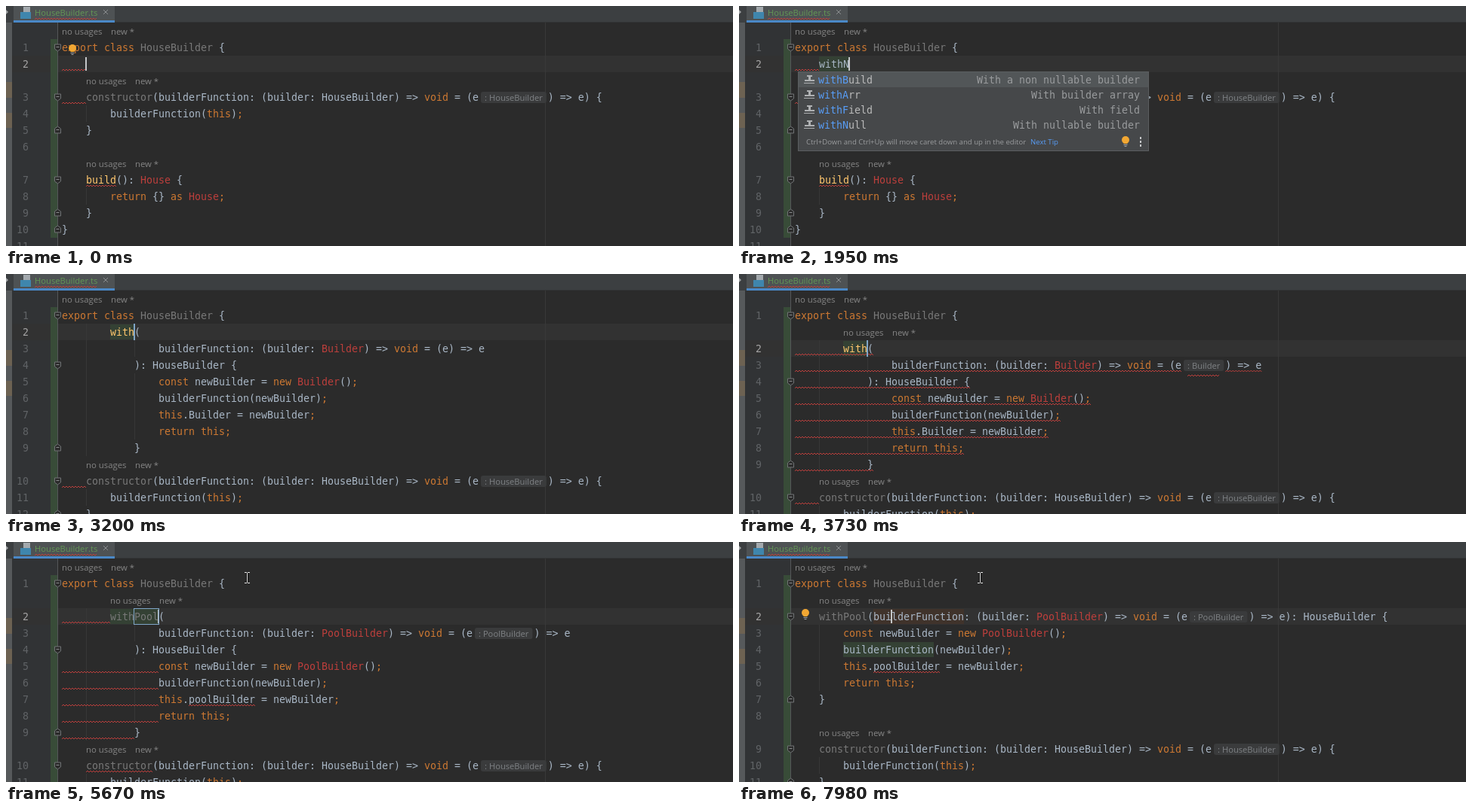
These frames come from a looping animation (963 px wide and 319 px high, 8.18 s). An HTML page with a canvas:

```html
<!DOCTYPE html>
<html lang="en">
<head>
<meta charset="utf-8">
<title>Live template</title>
<style>
  html, body { margin: 0; width: 100%; height: 100%; overflow: hidden; background: #2b2b2b; }
  canvas { display: block; }
</style>
</head>
<body>
<canvas id="stage" width="963" height="319"></canvas>
<script>
const ctx = document.getElementById('stage').getContext('2d');
const LOOP = 8180, LEFT = 74, CHAR = 8, ROW = 22, TOP = 33;
const MONO = '13.29px "DejaVu Sans Mono", "Noto Sans Mono", monospace';
const ui = size => `${size}px "Open Sans", "Noto Sans", sans-serif`;
const C = {
  text: '#a9b7c6', key: '#cc7832', red: '#bc3f3c', fn: '#ffc66d', dim: '#787878',
  read: '#344134', write: '#40332b', link: '#589df6'
};
const col = n => LEFT + n * CHAR;
const indent = s => s.length - s.trimStart().length;

function rect(x, y, w, h, color) {
  ctx.fillStyle = color;
  ctx.fillRect(x, y, w, h);
}

function label(s, x, y, color, font = MONO, align = 'left') {
  ctx.font = font;
  ctx.fillStyle = color;
  ctx.textAlign = align;
  ctx.fillText(s, x, y);
}

function path(points, color, width = 1, close = false) {
  ctx.beginPath();
  points.forEach(([x, y]) => ctx.lineTo(x, y));
  if (close) ctx.closePath();
  ctx.strokeStyle = color;
  ctx.lineWidth = width;
  ctx.stroke();
}

function wave(x0, x1, y) {
  const pts = [];
  for (let x = x0, i = 0; x <= x1; x += 2, i++) pts.push([x, y + (i % 2 ? -1 : 1)]);
  path(pts, C.red);
}

// Type hint shown inside a code line; returns the x behind it
function inlay(name, x, y) {
  ctx.font = ui(11.2);
  const w = ctx.measureText(': ' + name).width;
  ctx.fillStyle = '#3a3b3c';
  ctx.beginPath();
  ctx.roundRect(x + 3, y - 7, w + 10, 15, 3);
  ctx.fill();
  label(': ' + name, x + 8, y + 5, '#7f8285', ui(11.2));
  return x + w + 15;
}

// Markup: ~unresolved~ ^method^ _unused_ [type hint]
const TOKEN = /~(.+?)~|\^(.+?)\^|_(.+?)_|\[(.+?)\]|(\b(?:export|class|void|return|as|this|const|new)\b|;)|(\w+|\s+|.)/g;
function code(s, y) {
  let x = LEFT;
  for (const [, bad, fn, unused, hint, key, plain] of s.matchAll(TOKEN)) {
    if (hint) { x = inlay(hint, x, y); continue; }
    const word = bad || fn || unused || key || plain;
    const color = bad ? C.red : fn ? C.fn : unused ? C.dim : key ? C.key : C.text;
    label(word, x, y + 5, color);
    x += word.length * CHAR;
  }
  return x;
}

function foldIcon(y, closing) {
  const d = closing ? -1 : 1;
  const pts = [[64.5, y - 4 * d], [72.5, y - 4 * d], [72.5, y + 2 * d], [68.5, y + 5 * d], [64.5, y + 2 * d]];
  ctx.beginPath();
  pts.forEach(p => ctx.lineTo(...p));
  ctx.fillStyle = '#2b2b2b';
  ctx.fill();
  path(pts, '#707375', 1, true);
  path([[66.5, y - .5], [70.5, y - .5]], '#8a8c8e');
}

function bulb(x, y) {
  ctx.fillStyle = '#f2a733';
  ctx.beginPath();
  ctx.arc(x, y - 2, 5, 0, 7);
  ctx.fill();
  rect(x - 2.5, y + 1, 5, 2, '#f2a733');
  rect(x - 2.5, y + 4, 5, 1, '#a5a7a9');
  rect(x - 1.5, y + 6, 3, 1, '#a5a7a9');
}

function caret(x, y) { rect(x - 1, y - 9, 2, 18, '#c4c6c8'); }

function beam(x, y) {
  rect(x - 1, y - 6, 3, 13, '#111');
  rect(x, y - 6, 1, 13, '#e8e8e8');
  for (const top of [y - 7, y + 7]) {
    rect(x - 3, top, 3, 1, '#e8e8e8');
    rect(x + 1, top, 3, 1, '#e8e8e8');
  }
}

function frameTop() {
  rect(0, 0, 963, 22, '#3c3f41');
  rect(10, 0, 134, 22, '#4e5254');
  rect(10, 19, 134, 3, '#4a88c7');
  rect(144, 21, 819, 1, '#323435');
  rect(23, 1, 9, 8, '#a3a9ad');
  rect(19, 8, 14, 9, '#3f86ad');
  label('HouseBuilder.ts', 38, 13, '#629755', ui(11.2));
  wave(38, 121, 17);
  path([[129, 5], [135, 11]], '#8b8e90');
  path([[135, 5], [129, 11]], '#8b8e90');
  ctx.fillStyle = '#a0a3a5';
  ctx.beginPath();
  [[0, 5], [3, 8], [0, 11]].forEach(p => ctx.lineTo(...p));
  ctx.fill();
}

// Draws the editor; "#n" rows are usage notes at indent n. Returns line end positions by row.
function editor(rows, current, stripeEnd, marks = []) {
  rect(0, 0, 963, 319, '#2b2b2b');
  rect(8, 22, 61, 297, '#313335');
  rect(8, current - 11, 955, ROW, '#323232');
  rect(59, 44, 10, stripeEnd - 44, '#384c38');
  rect(68, 22, 1, 297, '#555759');
  rect(714, 22, 1, 297, '#393939');
  rect(0, 22, 8, 297, '#56595b');
  rect(0, 101, 8, 21, '#6d6252');
  rect(0, 142, 8, 20, '#6d6252');
  for (const [y, c0, c1, color] of marks) rect(col(c0), y - 10, (c1 - c0) * CHAR, 20, color);
  let n = 0;
  const ends = rows.map((s, i) => {
    const y = TOP + i * ROW;
    if (s[0] === '#') {
      const x = col(+s.slice(1));
      label('no usages', x, y + 5, '#868686', ui(11.35));
      label('new *', x + 65, y + 5, '#868686', ui(11.35));
      return x;
    }
    label(++n, 30, y + 5, y === current ? '#a4a3a3' : '#606366', MONO, 'right');
    for (let c = 4; c < indent(s); c += 8) rect(col(c), y - 11, 1, ROW, '#373737');
    const end = code(s, y);
    if (s.endsWith('{')) foldIcon(y, false);
    if (s.trim() === '}') foldIcon(y, true);
    return end;
  });
  frameTop();
  return ends;
}

const HEAD = ['#0', 'export class _HouseBuilder_ {'];
const CTOR = ['#4', '    _constructor_(builderFunction: (builder: HouseBuilder) => void = (e[HouseBuilder]) => e) {',
  '        builderFunction(this);', '    }'];
const BUILD = ['', '#4', '    ^build^(): ~House~ {', '        return {} as ~House~;', '    }', '}', ''];
const ITEMS = [['withBuild', 'With a non nullable builder'], ['withArr', 'With builder array'],
  ['withField', 'With field'], ['withNull', 'With nullable builder']];

// Last value whose start time has passed
const at = (t, steps) => steps.filter(([start]) => t >= start).pop()[1];

function popup(items, matched, withBulb) {
  const x = 78, y = 87, h = items.length * 20 + 26;
  rect(x, y, 465, h, '#5b5e60');
  rect(x + 1, y + 1, 463, h - 2, '#46484a');
  rect(x + 1, y + 1, 463, 20, '#525658');
  items.forEach(([name, note], i) => {
    const m = y + 11 + i * 20;
    rect(90, m - 6, 7, 2, '#afb1b3');
    rect(92, m - 4, 3, 4, '#afb1b3');
    rect(87, m, 13, 2, '#afb1b3');
    rect(86, m + 4, 14, 1, '#afb1b3');
    label(name.slice(0, matched), 105, m + 5, C.link);
    label(name.slice(matched), 105 + matched * CHAR, m + 5, '#bbbbbb');
    label(note, 531, m + 5, '#999b9d', MONO, 'right');
  });
  const foot = y + h - 13;
  label('Ctrl+Down and Ctrl+Up will move caret down and up in the editor', 89, foot + 4, '#999b9d', ui(9.6));
  label('Next Tip', 386, foot + 4, C.link, ui(9.6));
  for (let d = -5; d <= 5; d += 5) rect(531, foot - 1 + d, 2, 3, '#c5c7c9');
  if (withBulb) bulb(512, foot);
}

function typing(t) {
  const typed = at(t, [[0, ''], [860, 'w'], [1000, 'wi'], [1200, 'wit'], [1330, 'with'], [1950, 'withN']]);
  const end = 4 + typed.length;
  editor([...HEAD, '    ' + typed, ...CTOR, ...BUILD], 77, 308, [[77, 4, end, C.read]]);
  wave(LEFT, col(4), 85);
  wave(LEFT, col(4), 129);
  wave(col(4), col(9), 239);
  if (t < 400 || (t >= 860 && t < 2940)) caret(col(end), 77);
  if (t < 860) bulb(88, 58);
  if (t >= 930) popup(t < 2010 ? ITEMS : ITEMS.slice(3), typed.length, t >= 1530);
}

function template(t) {
  const name = at(t, [[0, ''], [4260, 'P'], [4530, 'Po'], [4680, 'Poo'], [4990, 'Pool']]);
  const hint = at(t, [[0, 'Builder'], [5060, 'PooBuilder'], [5340, 'PoolBuilder']]);
  const noted = t >= 3630, settled = t >= 5340;
  const q = settled ? '_' : '^';
  const pad = ' '.repeat(16);
  const method = [
    `        ${q}with${name}${q}(`,
    `${pad}builderFunction: (builder: ~${name}Builder~) => void = (e${noted ? `[${hint}]` : ''}) => e`,
    '            ): HouseBuilder {',
    `${pad}const newBuilder = new ~${name}Builder~();`,
    `${pad}builderFunction(newBuilder);`,
    `${pad}this.${name.toLowerCase()}Builder = newBuilder;`,
    `${pad}return this;`,
    '            }'
  ];
  const rows = [...HEAD, ...(noted ? ['#8'] : []), ...method, ...CTOR];
  const first = noted ? 3 : 2, y = TOP + first * ROW;
  const nameEnd = 12 + name.length;
  const ends = editor(rows, y, 319, [[y, 8, nameEnd, C.read]]);
  const under = i => y + i * ROW + 8;

  if (settled) {
    for (const i of [0, 3, 4, 5, 6, 7]) wave(LEFT, col(indent(method[i])), under(i));
    wave(col(21), col(32), under(5));
    wave(col(4), col(15), under(9));
  } else {
    if (t >= 3530) method.forEach((s, i) => {
      const end = ends[first + i];
      if (i === 1 && noted) {
        const hintX = col(64 + name.length);
        wave(LEFT, hintX, under(i));
        wave(hintX + 8, end - 56, under(i) + 6);
        wave(end - 48, end, under(i));
      } else wave(LEFT, end, under(i));
    });
    wave(LEFT, col(4), under(9));
  }

  caret(col(nameEnd), y);
  if (t < 5790) {
    ctx.strokeStyle = '#7fa5c8';
    ctx.lineWidth = 1;
    ctx.strokeRect(169.5, y - 10.5, name.length * CHAR + 1, 21);
  }
  if (settled) beam(319, 47);
}

function formatted(t) {
  const q = t < 6720 ? '^' : '_';
  editor([...HEAD, '#4',
    `    ${q}withPool${q}(builderFunction: (builder: ~PoolBuilder~) => void = (e[PoolBuilder]) => e): HouseBuilder {`,
    '        const newBuilder = new ~PoolBuilder~();',
    '        builderFunction(newBuilder);',
    '        this.poolBuilder = newBuilder;',
    '        return this;',
    '    }', '', ...CTOR], 99, 319, [[99, 13, 28, C.write], [143, 8, 23, C.read]]);
  wave(col(13), col(24), 173);
  if (t >= 6200 && t < 6460) {
    wave(LEFT, col(4), 107);
    wave(col(4), col(15), 283);
  }
  if (t < 7450 || t >= 7980) caret(col(16), 99);
  if (t >= 7250) bulb(88, 96);
  beam(319, 47);
}

function tick(now) {
  const t = now % LOOP;
  if (t < 3200) typing(t);
  else if (t < 6130) template(t);
  else formatted(t);
  requestAnimationFrame(tick);
}
requestAnimationFrame(tick);
</script>
</body>
</html>
```
